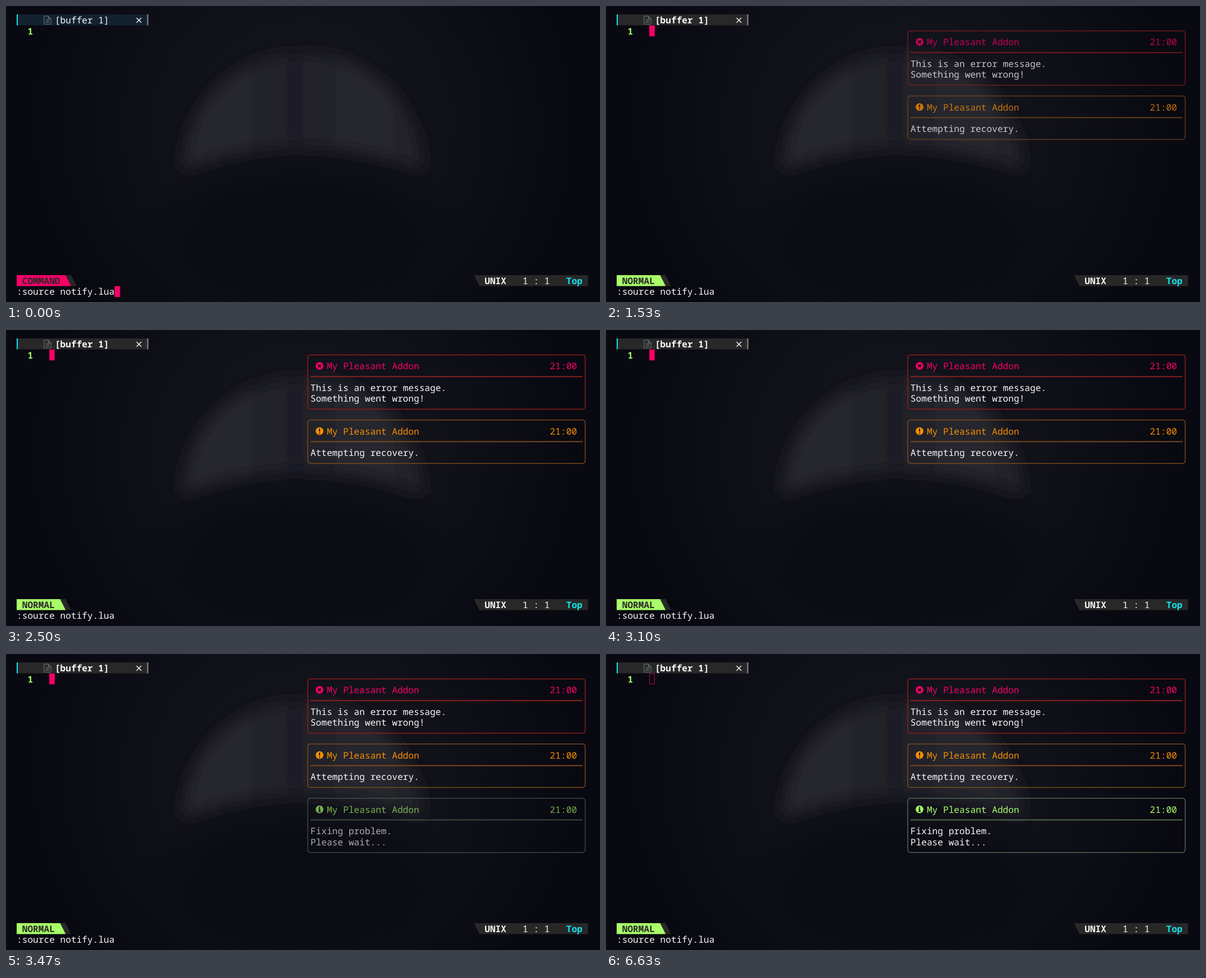
These frames come from a looping animation (1059x529 px, 8000 ms). An HTML page:

```html
<!DOCTYPE html>
<html lang="en">
<head>
<meta charset="utf-8">
<title>Editor notifications</title>
<style>
  html, body { margin: 0; width: 100%; height: 100%; overflow: hidden; background: #090911; }
  svg { display: block; width: 1059px; height: 529px; }
  text {
    font: 16.167px "Noto Sans Mono", "DejaVu Sans Mono", monospace;
    text-rendering: geometricPrecision;
    white-space: pre;
    fill: #f8f8f8;
  }
  .bold { font-weight: 700; }
  .green { fill: #a9ff68; }
  .pink { fill: #f70067; }
  .cyan { fill: #12e2ec; }
  .gray { fill: #282828; }
  .line { fill: none; stroke-width: 1.5; }
  .hidden { display: none; }
</style>
</head>
<body>
<svg id="stage" viewBox="0 0 1059 529">
  <defs>
    <radialGradient id="glow" gradientUnits="userSpaceOnUse" cx="528" cy="215" r="480">
      <stop offset="0" stop-color="#15151d"/>
      <stop offset=".5" stop-color="#111119"/>
      <stop offset="1" stop-color="#090911"/>
    </radialGradient>
    <linearGradient id="moonlight" gradientUnits="userSpaceOnUse" x1="310" y1="0" x2="748" y2="0">
      <stop offset="0" stop-color="#24242c"/>
      <stop offset=".22" stop-color="#27272f"/>
      <stop offset=".48" stop-color="#1e1e26"/>
      <stop offset=".56" stop-color="#23232b"/>
      <stop offset=".75" stop-color="#27272f"/>
      <stop offset="1" stop-color="#222229"/>
    </linearGradient>
    <radialGradient id="shade">
      <stop offset="0" stop-color="#0a0a12" stop-opacity=".9"/>
      <stop offset=".6" stop-color="#0a0a12" stop-opacity=".7"/>
      <stop offset="1" stop-color="#0a0a12" stop-opacity="0"/>
    </radialGradient>
    <filter id="blur" x="-20%" y="-20%" width="140%" height="140%">
      <feGaussianBlur stdDeviation="14"/>
    </filter>
  </defs>

  <rect width="1059" height="529" fill="#090911"/>
  <rect width="1059" height="529" fill="url(#glow)"/>
  <ellipse cx="528" cy="405" rx="300" ry="160" fill="url(#shade)"/>
  <path d="M314 296A215 212 0 0 1 744 296Q650 252 528 252T314 296Z"
        fill="url(#moonlight)" filter="url(#blur)"/>

  <rect id="tab" x="19" y="15" width="235" height="19.5"/>
  <rect x="19" y="15" width="2" height="19.5" class="cyan"/>
  <rect x="251.7" y="15" width="2" height="19.5" fill="#8a8a8e"/>
  <path d="M68 18.2h7.5l4.7 4.7v9.6H68zM75.5 18.2v4.7h4.7M70.8 24h6.6M70.8 26.7h6.6M70.8 29.4h6.6"
        fill="none" stroke="#626d70" stroke-width="1.2"/>
  <path d="M232.7 21.2l8.6 8.6m0-8.6l-8.6 8.6" stroke="#f8f8f8" stroke-width="1.4"/>

  <path d="M834.2 481H1037.5v19.5H844z" class="gray"/>
  <path id="tail" class="gray"/>
  <path id="badge"/>
  <g id="words"></g>
  <rect id="cursor"/>
  <g id="notices"></g>
</svg>
<script>
const LOOP = 8000, ENTER = 1400, BLUR = 6630;
const CELL = 9.7, ROW = 19.4, LEFT = 19, TOP = 15.3;
const $ = id => document.getElementById(id);
const colX = c => LEFT + c * CELL;
const rowY = r => TOP + r * ROW;

function add(parent, tag, attrs) {
  const el = document.createElementNS('http://www.w3.org/2000/svg', tag);
  for (const key in attrs) el.setAttribute(key, attrs[key]);
  return parent.appendChild(el);
}

function write(parent, col, row, str, attrs = {}) {
  const el = add(parent, 'text', { x: colX(col), y: rowY(row) + 16, ...attrs });
  el.textContent = str;
  return el;
}

const words = $('words');
const tabName = write(words, 7, 0, '[buffer 1]');
write(words, 2, 1, '1', { class: 'bold green' });
const mode = write(words, 1, 24, '', { class: 'bold', style: 'fill:#282828' });
write(words, 0, 25, ':source notify.lua');
write(words, 86, 24, 'UNIX', { class: 'bold' });
write(words, 93, 24, '1 : 1');
write(words, 101, 24, 'Top', { class: 'bold cyan' });

// Icon marks, centred on the disc
const MARKS = {
  error: 'M-2.4-2.4L2.4 2.4M2.4-2.4L-2.4 2.4',
  warn: 'M0-4.4V1M0 2.8V4.6',
  info: 'M0-4.6V-2.7M-1.8-.9H.2V3.5M-2 3.6H2.2'
};

function notice(kind, row, color, edge, lines, start) {
  const g = add($('notices'), 'g', {});
  const ink = { style: 'fill:' + color };
  const y = rowY(row + 0.5);
  add(g, 'rect', {
    x: colX(53.5), y, width: 51 * CELL, height: (lines.length + 3) * ROW,
    rx: 5, class: 'line', stroke: edge
  });
  add(g, 'path', {
    d: `M${colX(54)} ${y + 2 * ROW}H${colX(104)}`, stroke: edge, 'stroke-width': 2
  });
  const icon = add(g, 'g', { transform: `translate(559 ${y + ROW + 0.4})` });
  add(icon, 'circle', { r: 6.9, fill: color });
  add(icon, 'path', { d: MARKS[kind], fill: 'none', stroke: '#0d0d15', 'stroke-width': 2.1 });
  write(g, 57, row + 1, 'My Pleasant Addon', ink);
  write(g, 98, row + 1, '21:00', ink);
  lines.forEach((line, i) => write(g, 54, row + 3 + i, line));
  return { g, start };
}

const notices = [
  notice('error', 1, '#f70067', '#8a1f1f', ['This is an error message.', 'Something went wrong!'], 1080),
  notice('warn', 7, '#f79000', '#79491d', ['Attempting recovery.'], 1080),
  notice('info', 12, '#a9ff68', '#4f6752', ['Fixing problem.', 'Please wait...'], 3100)
];

// Critically damped spring, one cycle per second
function spring(ms) {
  const p = 2 * Math.PI * Math.max(0, ms) / 1000;
  return 1 - (1 + p) * Math.exp(-p);
}

function place(el, attrs) {
  for (const key in attrs) el.setAttribute(key, attrs[key]);
}

function setState(state) {
  const typing = state === 'command';
  const hollow = state === 'unfocused';
  const name = typing ? 'COMMAND' : 'NORMAL';
  const end = colX(name.length + 2);

  mode.textContent = name;
  $('badge').setAttribute('class', typing ? 'pink' : 'green');
  $('badge').setAttribute('d', `M19 481H${end}l${CELL} 19.5H19z`);
  $('tail').setAttribute('d', `M${end} 481h${CELL}l${CELL} 19.5h${-CELL}z`);
  $('tab').setAttribute('fill', typing ? '#122230' : '#282828');
  tabName.setAttribute('class', typing ? '' : 'bold');

  const inset = hollow ? 0.5 : 0;
  place($('cursor'), {
    x: (typing ? 193.6 : 77.2) + inset,
    y: (typing ? 500.6 : 34.8) + inset,
    width: CELL - 2 * inset,
    height: ROW - 2 * inset,
    fill: hollow ? 'none' : '#f70067',
    stroke: hollow ? '#c8005a' : 'none'
  });
}

let current;
function draw() {
  const t = performance.now() % LOOP;
  const state = t < ENTER ? 'command' : t < BLUR ? 'normal' : 'unfocused';
  if (state !== current) setState(current = state);
  for (const { g, start } of notices) {
    g.classList.toggle('hidden', t < ENTER);
    g.setAttribute('opacity', spring(t - start));
  }
  requestAnimationFrame(draw);
}
draw();
</script>
</body>
</html>
```
